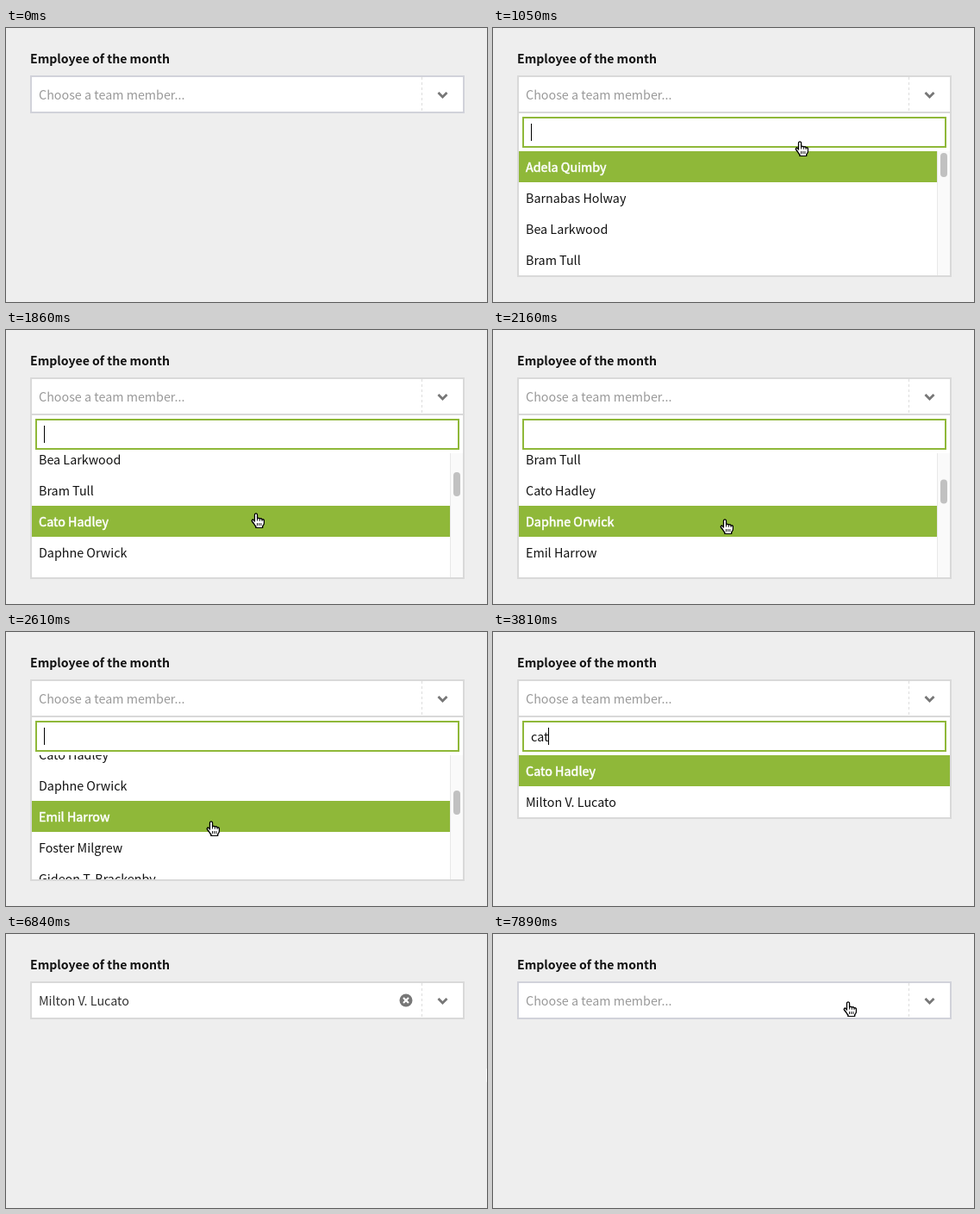
Recreate the animation shown at these times as an HTML page with a canvas. Size 558 px wide and 318 px high, loop 8000 ms.

```html
<!DOCTYPE html>
<html lang="en">
<head>
<meta charset="utf-8">
<title>Searchable select</title>
<style>
  html, body { margin: 0; width: 100%; height: 100%; overflow: hidden; background: #eee; }
  canvas { display: block; width: 558px; height: 318px; }
</style>
</head>
<body>
<canvas id="stage"></canvas>
<script>
const WIDTH = 558, HEIGHT = 318, LOOP = 8000;
const ROW = 36, LIST_TOP = 143, LIST_HEIGHT = 144;
const FAMILY = '"Noto Sans CJK JP", "Noto Sans CJK SC", "Noto Sans CJK", "Open Sans", sans-serif';
const REGULAR = `14.32px ${FAMILY}`, BOLD = `bold 14.1px ${FAMILY}`;
const GREEN = '#8fb839', GREY = '#777';

const NAMES = ['Adela Quimby', 'Barnabas Holway', 'Bea Larkwood', 'Bram Tull',
  'Cato Hadley', 'Daphne Orwick', 'Emil Harrow', 'Foster Milgrew',
  'Gideon T. Brackenby', 'Milton V. Lucato', 'Nora Pell', 'Oswin Hale',
  'Petra Lunn', 'Rufus Thorne', 'Sylvie Marsh', 'Walt Embry'];
const CHOSEN = 'Milton V. Lucato';

// Event times in ms
const OPEN = 560, KEYS = [3300, 3570, 3810], QUERY = 'cat';
const MOUSE_BACK = 4170, PICK = 5070, CLEAR = 7590;

// Keyframes: [time, value...]
const POINTER = [[210, 558, 145], [560, 390, 80], [800, 380, 82], [1200, 340, 165],
  [1530, 314, 195], [2160, 269, 220], [2610, 238, 220], [3060, 215, 165],
  [4170, 215, 165], [4850, 180, 184], [5540, 180, 184], [5940, 215, 319],
  [5941, 558, 157], [6830, 558, 157], [7320, 463, 77], [7590, 463, 77], [7880, 412, 79]];
const SCROLL = [[1180, 0], [1530, 42], [2160, 119], [2610, 163], [3060, 185]];

const HAND = new Path2D('M-1.5 9V1.5Q-1.5 0 0 0Q1.5 0 1.5 1.5V6Q3 4.6 4.3 6.2Q6 5.2 7 7' +
  'Q9.2 6.4 9.4 8.6V11Q9.2 13 7.6 14.6V16.5H0V15Q-1.5 13.6 -2.5 11.5L-4.6 9Q-5 7 -3.3 7.2Z');
const HAND_LINES = new Path2D('M1.5 6V8.5M4.3 6.5V8.8M7 7V9M1.5 11V14M3.7 11V14M5.9 11V14');
const ARROW = new Path2D('M0 0V14L3.2 11L5.4 16L7.8 15L5.6 10.2H10Z');

const canvas = document.getElementById('stage');
const ctx = canvas.getContext('2d');
const ratio = window.devicePixelRatio || 1;
canvas.width = WIDTH * ratio;
canvas.height = HEIGHT * ratio;

// Monotone cubic interpolation: smooth, and comes to rest at pauses
function track(keys, t, column = 1) {
  const last = keys.length - 1;
  if (t <= keys[0][0]) return keys[0][column];
  if (t >= keys[last][0]) return keys[last][column];
  const i = keys.findIndex(key => key[0] > t) - 1;
  const slope = n => n < 0 || n >= last ? 0
    : (keys[n + 1][column] - keys[n][column]) / (keys[n + 1][0] - keys[n][0]);
  const tangent = n => {
    const a = slope(n - 1), b = slope(n);
    return a * b > 0 ? 2 * a * b / (a + b) : 0;
  };
  const span = keys[i + 1][0] - keys[i][0], u = (t - keys[i][0]) / span, v = 1 - u;
  return keys[i][column] * v * v * (1 + 2 * u) + keys[i + 1][column] * u * u * (3 - 2 * u)
    + span * u * v * (tangent(i) * v - tangent(i + 1) * u);
}

function fill(color, x, y, w, h) {
  ctx.fillStyle = color;
  ctx.fillRect(x, y, w, h);
}

function frame(color, x, y, w, h) {
  ctx.strokeStyle = color;
  ctx.lineWidth = 2;
  ctx.strokeRect(x, y, w, h);
}

function text(string, x, y, color, font = REGULAR) {
  ctx.font = font;
  ctx.fillStyle = color;
  ctx.fillText(string, x, y);
}

function line(color, width, points) {
  ctx.strokeStyle = color;
  ctx.lineWidth = width;
  ctx.beginPath();
  points.forEach(([x, y]) => ctx.lineTo(x, y));
  ctx.stroke();
}

function drawField(value, border) {
  fill('#fff', 28, 55, 504, 44);
  frame(border, 29, 56, 502, 42);
  text(value || 'Choose a team member...', 38, 83, value ? '#333' : '#999');
  ctx.setLineDash([3, 3]);
  line('#ddd', 1, [[482.5, 57], [482.5, 97]]);
  ctx.setLineDash([]);
  line(GREY, 2.8, [[501.5, 75], [506.5, 80], [511.5, 75]]);
  if (value) {
    ctx.fillStyle = GREY;
    ctx.beginPath();
    ctx.arc(464, 77, 7.5, 0, 7);
    ctx.fill();
    line('#fff', 2.2, [[461, 74], [467, 80]]);
    line('#fff', 2.2, [[467, 74], [461, 80]]);
  }
}

function drawMenu(t, names, query, scroll, hovered, caretOn) {
  const height = Math.min(LIST_HEIGHT, names.length * ROW);
  const scrollable = names.length * ROW > LIST_HEIGHT;
  const right = scrollable ? 515 : 530;
  fill('#fff', 28, 99, 504, LIST_TOP + height - 99);
  frame('#d9d9d9', 29, 98, 502, LIST_TOP + height - 97);
  frame(GREEN, 35, 104, 490, 34);
  text(query, 44, 127, '#111');
  if (caretOn) fill('#000', 44 + Math.floor(ctx.measureText(query).width), 111, 1, 20);

  ctx.save();
  ctx.beginPath();
  ctx.rect(30, LIST_TOP, 500, height);
  ctx.clip();
  names.forEach((name, i) => {
    const top = LIST_TOP + i * ROW - scroll;
    if (i === hovered) {
      fill(GREEN, 30, top, right - 30, ROW);
      ctx.strokeStyle = '#fff';
      ctx.lineWidth = 0.5;
      ctx.font = REGULAR;
      ctx.strokeText(name, 38, top + 24);
    }
    text(name, 38, top + 24, i === hovered ? '#fff' : '#111');
  });
  if (scrollable) {
    fill('#fafafa', 515, LIST_TOP, 15, height);
    fill('#e8e8e8', 515, LIST_TOP, 1, height);
    ctx.fillStyle = '#c1c1c1';
    ctx.beginPath();
    ctx.roundRect(519, 145 + scroll * 0.24, 8, 28, 4);
    ctx.fill();
  }
  ctx.restore();
}

function drawPointer(x, y, isHand) {
  ctx.save();
  ctx.translate(x, y);
  ctx.lineJoin = 'round';
  ctx.lineWidth = isHand ? 1.2 : 2;
  ctx.fillStyle = isHand ? '#fff' : '#000';
  ctx.strokeStyle = isHand ? '#000' : '#fff';
  const shape = isHand ? HAND : ARROW;
  ctx.stroke(shape);
  ctx.fill(shape);
  if (isHand) {
    ctx.stroke(shape);
    ctx.lineWidth = 0.9;
    ctx.stroke(HAND_LINES);
  }
  ctx.restore();
}

function draw(t) {
  const open = t >= OPEN && t < PICK;
  const value = t >= PICK && t < CLEAR ? CHOSEN : '';
  const typed = KEYS.filter(time => t >= time).length;
  const query = QUERY.slice(0, typed);
  const names = NAMES.filter(name => name.toLowerCase().includes(query));
  const scroll = typed ? 0 : Math.round(track(SCROLL, t));
  const x = Math.round(track(POINTER, t)), y = Math.round(track(POINTER, t, 2));
  const hidden = t < 210 || (t >= KEYS[0] && t < MOUSE_BACK);
  const listBottom = LIST_TOP + Math.min(LIST_HEIGHT, names.length * ROW);
  const overList = open && !hidden && y >= LIST_TOP && y < listBottom;
  const hovered = overList ? Math.floor((y - LIST_TOP + scroll) / ROW) : 0;
  const caretOn = (t - (typed ? KEYS[typed - 1] : OPEN)) % 1000 < 500;

  ctx.setTransform(ratio, 0, 0, ratio, 0, 0);
  fill('#eee', 0, 0, WIDTH, HEIGHT);
  text('Employee of the month', 28, 41, '#111', BOLD);
  if (open) drawMenu(t, names, query, scroll, hovered, caretOn);
  drawField(value, open || value ? '#d9d9d9' : '#d1d2da');
  const overField = x >= 28 && x < 532 && y >= 55 && y < (open ? listBottom : 99);
  if (!hidden) drawPointer(x, y, overField);
}

const start = performance.now();
function tick() {
  draw((performance.now() - start) % LOOP);
  requestAnimationFrame(tick);
}
tick();
</script>
</body>
</html>
```
